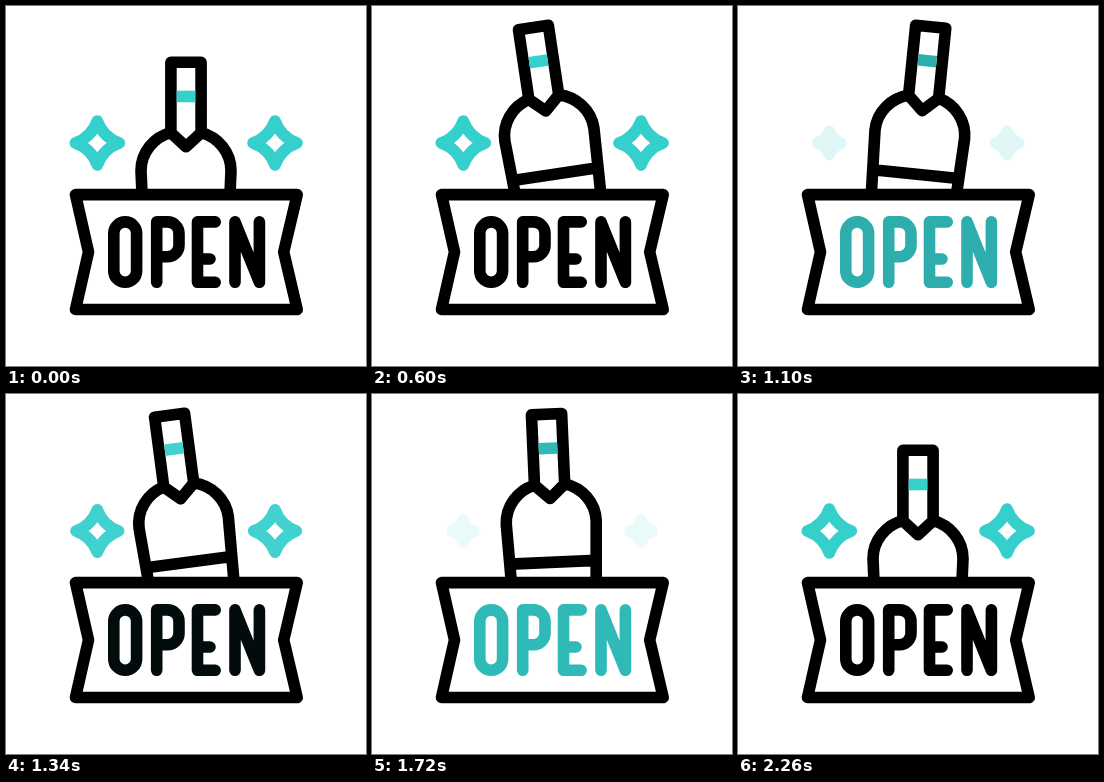
Write an HTML page that moves like this. It is 360 px wide and 360 px high and loops after 2.4 s.

```html
<!DOCTYPE html>
<html lang="en">
<head>
<meta charset="utf-8">
<title>Open sign</title>
<style>
  html, body { margin: 0; width: 100%; height: 100%; overflow: hidden; background: #fff; }
  svg { display: block; width: 100vw; height: 100vh; }
  path { stroke-width: 11.6; stroke-linecap: round; stroke-linejoin: round; }
  #band { stroke-linecap: butt; }
</style>
</head>
<body>
<svg viewBox="0 0 360 360" fill="none" stroke="#000" role="img" aria-label="OPEN">
  <g id="bottle">
    <path d="M164.9 90.5V20.1H195.1V90.5L180 104.5Z"/>
    <path d="M164.9 90.5C147.5 95 135 110.5 135 128.5L137.7 190 140 240H220L222.3 190 225 128.5C225 110.5 212.5 95 195.1 90.5M137 168.3H223"/>
    <path id="band" d="M170.7 54.3H189.3"/>
  </g>
  <path fill="#fff" d="M69.5 188.6H291.2L277.7 246 291.2 303.5H69.5L82.5 246Z"/>
  <g id="letters">
    <path d="M107.8 227.3a11.4 11.4 0 0 1 22.8 0V264.9a11.4 11.4 0 0 1-22.8 0Z"/>
    <path d="M150.7 276.3V215.9H161.5a11.5 11.5 0 0 1 11.5 11.5V239.2a11.5 11.5 0 0 1-11.5 11.5H150.7"/>
    <path d="M209.2 215.9H191.5V276.3H209.2M191.5 253H204"/>
    <path d="M229 276.3V215.9L253.4 276.3V215.9"/>
  </g>
  <path class="star"/>
  <path class="star"/>
</svg>
<script>
const LOOP = 2400, TEAL = [53, 207, 204], WHITE = [255, 255, 255], BLACK = [0, 0, 0];
const $ = id => document.getElementById(id);
const stars = document.querySelectorAll('.star');
const starCenters = [[91.3, 137], [269, 137]];

// [time, value] keys, eased in and out
const lift = [[0, 36.2], [400, 0], [1840, 0], [2240, 36.2]];
const tilt = [[400, 0], [600, -8.5], [1000, 8.5], [1400, -8.5], [1900, 0]];
const pulse = [[600, 0], [1000, 1], [1400, 0], [1800, 1], [2200, 0]];

function at(keys, t) {
  const i = keys.findIndex(k => k[0] > t);
  if (i < 0) return keys[keys.length - 1][1];
  if (i === 0) return keys[0][1];
  const [t0, a] = keys[i - 1], [t1, b] = keys[i];
  const x = (t - t0) / (t1 - t0);
  return a + (b - a) * x * x * (3 - 2 * x);
}

const mix = (a, b, p) => `rgb(${a.map((v, i) => Math.round(v + (b[i] - v) * p))})`;

function starPath([x, y], size) {
  const p = (dx, dy) => `${x + dx * size} ${y + dy * size}`;
  return `M${p(0, -22)}C${p(4, -11)} ${p(11, -4)} ${p(22, 0)}` +
    `C${p(11, 4)} ${p(4, 11)} ${p(0, 22)}` +
    `C${p(-4, 11)} ${p(-11, 4)} ${p(-22, 0)}` +
    `C${p(-11, -4)} ${p(-4, -11)} ${p(0, -22)}Z`;
}

function draw(now) {
  const t = now % LOOP, p = at(pulse, t);
  const starColor = mix(TEAL, WHITE, p), letterColor = mix(BLACK, TEAL, p);
  $('bottle').setAttribute('transform', `translate(0 ${at(lift, t)}) rotate(${at(tilt, t)} 180 146)`);
  $('letters').setAttribute('stroke', letterColor);
  $('band').setAttribute('stroke', p < 0.58 ? starColor : letterColor);
  stars.forEach((star, i) => {
    star.setAttribute('d', starPath(starCenters[i], 1 - 0.55 * p));
    star.setAttribute('stroke', starColor);
  });
}

const start = performance.now();
function tick() {
  draw(performance.now() - start);
  requestAnimationFrame(tick);
}
tick();
</script>
</body>
</html>
```
